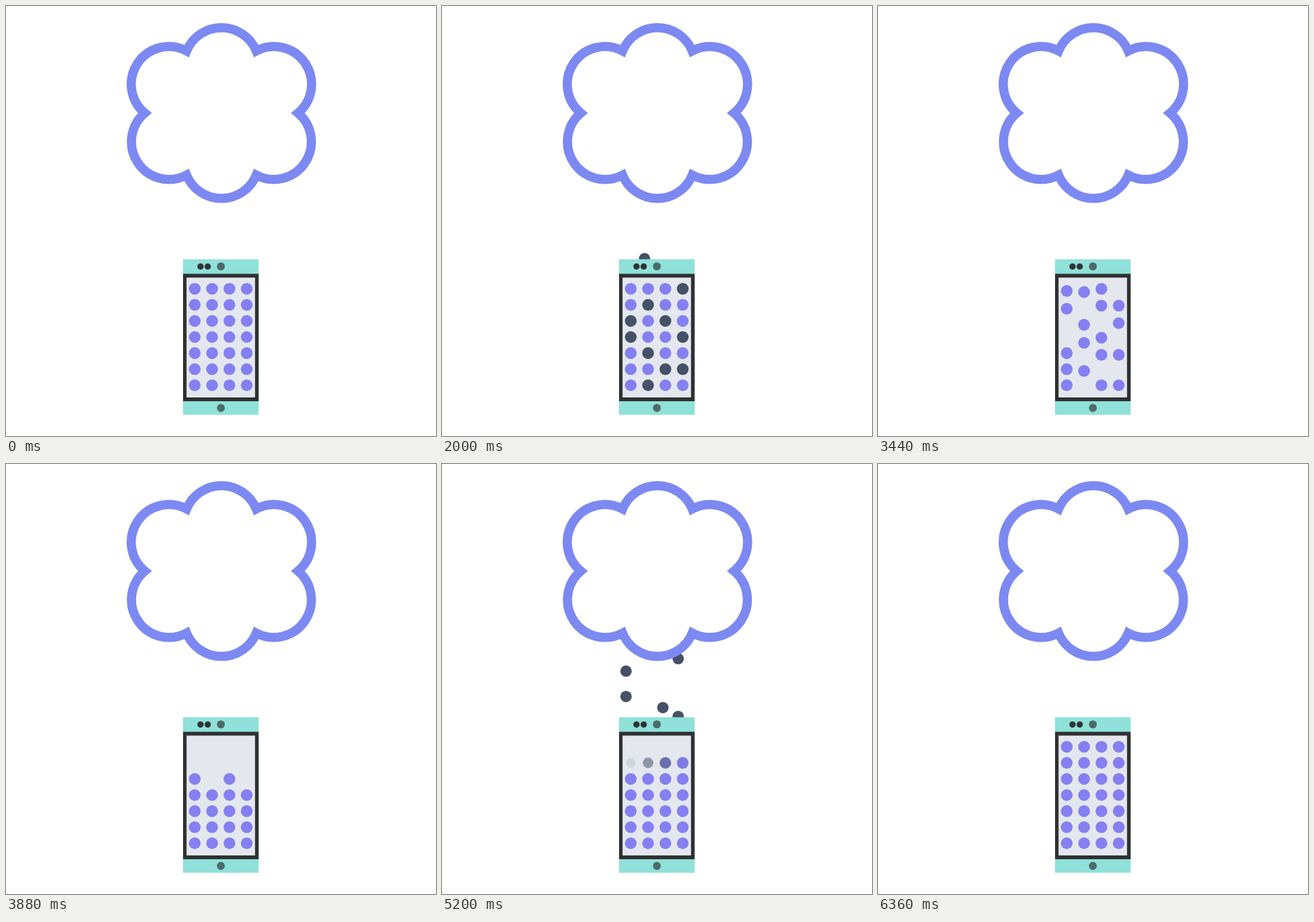
Animation, 680 px wide and 680 px high, one loop 6440 ms. Source, as an HTML page without scripts:

```html
<!DOCTYPE html>
<html lang="en">
<head>
<meta charset="utf-8">
<title>Phone and cloud</title>
<style>
  @property --t { syntax: "<number>"; inherits: true; initial-value: 0; }
  @keyframes clock { from { --t: 0 } to { --t: 6440 } }

  html, body { margin: 0; width: 100%; height: 100%; overflow: hidden; background: #fff }
  /* one clock in ms drives every part, ticking each 40 ms */
  svg { display: block; width: 100%; height: 100%; animation: clock 6440ms steps(161) -2ms infinite }

  /* grid dots: --x column, --y row */
  .grid circle {
    cx: calc(298.5px + var(--x) * 27.4px);
    cy: calc(447.2px + var(--y) * 25.42px);
    r: 9.3px;
    fill: #8480f2;
  }

  /* --s start of the fall, --n rows to fall */
  .stay circle {
    --p: clamp(0, (var(--t) - var(--s)) / 440, 1);
    transform: translateY(calc(var(--p) * var(--p) * (3 - 2 * var(--p)) * var(--n) * 25.42px));
  }

  /* --i order: darken from the top, vanish from the bottom */
  .gone circle {
    --p: clamp(0, (var(--t) - 320 - var(--i) * 115) / 480, 1);
    --q: clamp(0, (var(--t) - 1980 - (9 - var(--i)) * 96) / 480, 1);
    --out: (var(--q) * var(--q) * (3 - 2 * var(--q)));
    fill: color-mix(in srgb, #445166 calc(var(--p) * var(--p) * (3 - 2 * var(--p)) * 100%), #8480f2);
    opacity: calc(1 - var(--out));
    r: calc(9.3px * (1 - .22 * var(--out)));
  }

  /* --s start: grow in dark, then turn violet */
  .fresh circle {
    --p: clamp(0, (var(--t) - var(--s)) / 480, 1);
    --q: clamp(0, (var(--t) - var(--s) - 200) / 430, 1);
    --in: (var(--p) * var(--p) * (3 - 2 * var(--p)));
    fill: color-mix(in srgb, #8480f2 calc(var(--q) * var(--q) * (3 - 2 * var(--q)) * 100%), #445166);
    opacity: calc(var(--in));
    r: calc(9.3px * (.78 + .22 * var(--in)));
  }

  /* travelling dots: --s is the moment they pass the top of the phone */
  .lane circle {
    --dir: 1;
    --lead: 89;
    --p: clamp(0, (var(--t) - var(--s) + var(--lead)) / 459, 1);
    cx: var(--x);
    cy: calc(338px + var(--dir) * 75px * cos(var(--p) * 180deg));
    r: 9px;
    fill: #445166;
  }
  .down circle { --dir: -1; --lead: 369 }
  .a { --x: 291px }
  .b { --x: 320.3px }
  .c { --x: 349.3px }
  .d { --x: 373.5px }
</style>
</head>
<body>
<svg viewBox="0 0 680 680">
  <g class="lane up">
    <circle class="b" style="--s:2000"/>
    <circle class="d" style="--s:2080"/>
    <circle class="a" style="--s:2160"/>
    <circle class="c" style="--s:2240"/>
    <circle class="b" style="--s:2320"/>
    <circle class="d" style="--s:2400"/>
    <circle class="a" style="--s:2480"/>
    <circle class="a" style="--s:2640"/>
    <circle class="a" style="--s:2720"/>
    <circle class="c" style="--s:2760"/>
    <circle class="b" style="--s:2840"/>
    <circle class="d" style="--s:2920"/>
    <circle class="a" style="--s:3040"/>
  </g>
  <g class="lane down">
    <circle class="a" style="--s:4480"/>
    <circle class="b" style="--s:4520"/>
    <circle class="c" style="--s:4600"/>
    <circle class="b" style="--s:4640"/>
    <circle class="a" style="--s:4640"/>
    <circle class="d" style="--s:4720"/>
    <circle class="a" style="--s:4840"/>
    <circle class="b" style="--s:4920"/>
    <circle class="c" style="--s:5000"/>
    <circle class="b" style="--s:5120"/>
    <circle class="d" style="--s:5200"/>
    <circle class="c" style="--s:5240"/>
    <circle class="a" style="--s:5280"/>
    <circle class="a" style="--s:5360"/>
    <circle class="d" style="--s:5400"/>
    <circle class="b" style="--s:5520"/>
    <circle class="c" style="--s:5600"/>
    <circle class="a" style="--s:5680"/>
    <circle class="d" style="--s:5800"/>
    <circle class="b" style="--s:5880"/>
    <circle class="a" style="--s:5960"/>
    <circle class="c" style="--s:6080"/>
    <circle class="b" style="--s:6160"/>
    <circle class="d" style="--s:6240"/>
    <circle class="a" style="--s:6280"/>
  </g>

  <path fill="#fff" stroke="#7c89f2" stroke-width="14.5" stroke-miterlimit="6"
    d="M285.6 71.1A59.5 59.5 0 0 1 395.7 71.1A59.5 59.5 0 0 1 461.8 169.3A59.5 59.5 0 0 1 395.7 267.4A59.5 59.5 0 0 1 285.6 267.4A59.5 59.5 0 0 1 219.5 169.3A59.5 59.5 0 0 1 285.6 71.1Z"/>

  <g>
    <rect x="280" y="400.5" width="119.5" height="246" fill="#8fe1d9"/>
    <rect x="280" y="423.5" width="119.5" height="201.5" fill="#2f3131"/>
    <rect x="285.5" y="429.5" width="108.3" height="189.5" fill="#e4e7ee"/>
    <g fill="#2f3433"><circle cx="307.6" cy="412" r="5"/><circle cx="319" cy="412" r="5"/></g>
    <g fill="#4d6a67"><circle cx="339.8" cy="411.8" r="6.3"/><circle cx="339.8" cy="635.6" r="6.3"/></g>
  </g>

  <g class="grid stay">
    <circle style="--x:0;--y:0;--n:2;--s:3370"/>
    <circle style="--x:0;--y:1;--n:2;--s:3345"/>
    <circle style="--x:0;--y:4;--n:0;--s:0"/>
    <circle style="--x:0;--y:5;--n:0;--s:0"/>
    <circle style="--x:0;--y:6;--n:0;--s:0"/>
    <circle style="--x:1;--y:0;--n:3;--s:3370"/>
    <circle style="--x:1;--y:2;--n:2;--s:3345"/>
    <circle style="--x:1;--y:3;--n:2;--s:3320"/>
    <circle style="--x:1;--y:5;--n:1;--s:3350"/>
    <circle style="--x:2;--y:0;--n:2;--s:3425"/>
    <circle style="--x:2;--y:1;--n:2;--s:3400"/>
    <circle style="--x:2;--y:3;--n:1;--s:3383"/>
    <circle style="--x:2;--y:4;--n:1;--s:3350"/>
    <circle style="--x:2;--y:6;--n:0;--s:0"/>
    <circle style="--x:3;--y:1;--n:2;--s:3400"/>
    <circle style="--x:3;--y:2;--n:2;--s:3370"/>
    <circle style="--x:3;--y:4;--n:1;--s:3350"/>
    <circle style="--x:3;--y:6;--n:0;--s:0"/>
  </g>
  <g class="grid gone">
    <circle style="--x:3;--y:0;--i:0"/>
    <circle style="--x:1;--y:1;--i:1"/>
    <circle style="--x:0;--y:2;--i:2"/>
    <circle style="--x:2;--y:2;--i:3"/>
    <circle style="--x:0;--y:3;--i:4"/>
    <circle style="--x:3;--y:3;--i:5"/>
    <circle style="--x:1;--y:4;--i:6"/>
    <circle style="--x:2;--y:5;--i:7"/>
    <circle style="--x:3;--y:5;--i:8"/>
    <circle style="--x:1;--y:6;--i:9"/>
  </g>
  <g class="grid fresh">
    <circle style="--x:1;--y:2;--s:4346"/>
    <circle style="--x:3;--y:2;--s:4550"/>
    <circle style="--x:3;--y:1;--s:4646"/>
    <circle style="--x:2;--y:1;--s:4796"/>
    <circle style="--x:1;--y:1;--s:4946"/>
    <circle style="--x:0;--y:1;--s:5096"/>
    <circle style="--x:3;--y:0;--s:5246"/>
    <circle style="--x:2;--y:0;--s:5396"/>
    <circle style="--x:1;--y:0;--s:5546"/>
    <circle style="--x:0;--y:0;--s:5696"/>
  </g>
</svg>
</body>
</html>
```
